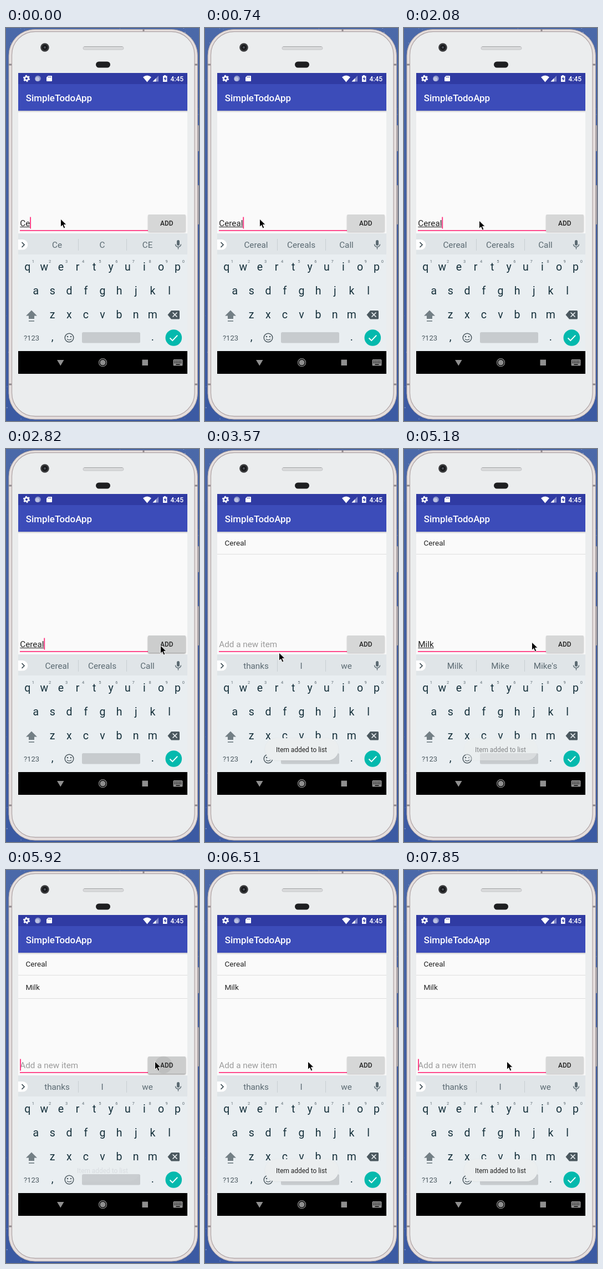
These frames come from a looping animation (348 px wide and 708 px high, 8000 ms). An HTML page:

```html
<!DOCTYPE html>
<html lang="en">
<head>
<meta charset="utf-8">
<title>Todo app</title>
<style>
html, body { margin: 0; width: 100%; height: 100%; overflow: hidden; background: #4362a4; }
svg { display: block; width: 348px; height: 708px; font-family: Roboto, sans-serif; }
.mid { text-anchor: middle; }
.med { font-weight: 500; }
.key { font-size: 19.5px; fill: #15303b; text-anchor: middle; }
.num { font-size: 7.5px; fill: #5f6c73; text-anchor: middle; }
.tip { font-size: 15.25px; fill: #5b6a72; text-anchor: middle; }
.row { font-size: 13.55px; fill: #212121; }
</style>
</head>
<body>
<svg viewBox="0 0 348 708">
  <defs>
    <linearGradient id="sky" x2="0" y2="1">
      <stop stop-color="#4b69a9"/><stop offset=".5" stop-color="#405da0"/><stop offset="1" stop-color="#3b5aa3"/>
    </linearGradient>
    <linearGradient id="shade" x2="0" y2="1">
      <stop stop-opacity=".2"/><stop offset="1" stop-opacity="0"/>
    </linearGradient>
    <filter id="soft" x="-20%" y="-40%" width="140%" height="180%"><feGaussianBlur stdDeviation="1.3"/></filter>
  </defs>
  <rect width="348" height="708" fill="url(#sky)"/>
  <g id="stars" fill="#b7c6e2"></g>

  <!-- phone -->
  <g fill="#a9a4a8">
    <rect x="343" y="175" width="5" height="47" rx="1.5"/>
    <rect x="343" y="283" width="5" height="71" rx="1.5"/>
  </g>
  <rect x="5" y="2.5" width="340.5" height="702.5" rx="47" fill="#e6dfde" stroke="#a79fa2"/>
  <path d="M5 66h5M340 66h5M5 642h5M340 642h5M248 2v4" stroke="#8f888c" stroke-width="3"/>
  <rect x="10.500" y="6.500" width="329.500" height="693" rx="42" fill="#ebedee" stroke="#b3a9aa" stroke-width="1.300"/>
  <circle cx="70" cy="35" r="7.8" fill="#3a3b3d"/>
  <circle cx="70" cy="35" r="5" fill="#18191b"/>
  <circle cx="70" cy="35" r="2" fill="#4b4e55"/>
  <rect x="139" y="33.5" width="73" height="5.500" rx="2.700" fill="#d9dadb" stroke="#c3c4c6"/>
  <path d="M141 33.500h69" stroke="#a2a3a5"/>
  <rect x="162" y="60.5" width="26" height="11" rx="5.5" fill="#1e1f21"/>

  <!-- app -->
  <rect x="22" y="81" width="305" height="542" fill="#fafafa"/>
  <g id="items"></g>
  <rect x="22" y="149" width="305" height="3.500" fill="url(#shade)"/>
  <rect x="22" y="101" width="305" height="48" fill="#3c4cb9"/>
  <rect x="22" y="81" width="305" height="20" fill="#303ba3"/>
  <text x="35.8" y="131.8" font-size="16.9" class="med" fill="#fff">SimpleTodoApp</text>
  <g fill="#fff">
    <circle cx="37" cy="91" r="3.4" fill="none" stroke="#fff" stroke-width="2.6"/>
    <circle cx="37" cy="91" r="5.3" fill="none" stroke="#fff" stroke-width="1.8" stroke-dasharray="2.8 2.75"/>
    <circle cx="57.5" cy="91" r="5.3" fill="#8f98cc"/>
    <circle cx="56.5" cy="92" r="3.8" fill="#bcc2e2"/>
    <path d="M76 86h6q1 0 1 1v8q0 1-1 1h-8q-1 0-1-1v-6z"/>
    <path d="M76.5 87.5v2M78.5 87.5v2M80.5 87.5v2" stroke="#303ba3" stroke-width=".9"/>
    <path d="M247 88.500Q254.500 82.500 262 88.500L254.500 97.500z"/>
    <path d="M275 86v10.500h-10.500z" opacity=".4"/>
    <path d="M270.500 90.500v6h-6z"/>
    <path d="M285 85h3v1.200h2.500v10.800h-7.500v-10.800h2z"/>
    <path d="M287.500 87.500l-3 4.500h2v3.500l3-4.700h-2z" fill="#303ba3"/>
    <text x="296.500" y="95.600" font-size="12" class="med">4:45</text>
  </g>

  <!-- entry line -->
  <text id="entry" x="25.300" y="357" font-size="15.25"></text>
  <rect id="under" x="25.300" y="358" height="1" fill="#212121"/>
  <rect x="25" y="364" width="231" height="1.700" fill="#ff2f7c"/>
  <rect id="caret" y="340.500" width="1.800" height="21" fill="#ff2f7c"/>
  <rect id="glow" x="256" y="337.500" width="68" height="31" rx="2" filter="url(#soft)"/>
  <rect id="button" x="256" y="336" width="68" height="31" rx="2"/>
  <circle id="ripple" cx="284" cy="351" r="15.500"/>
  <text x="289.700" y="355.900" font-size="11.860" class="mid med" fill="#212121">ADD</text>

  <!-- keyboard -->
  <rect x="22" y="370" width="305" height="213" fill="#e9eef1"/>
  <rect x="22" y="370" width="305" height="38" fill="#e0e5e8"/>
  <path d="M22 381h8a9.300 9.300 0 0 1 0 18.600h-8z" fill="#fff"/>
  <path d="M28.500 386l4.500 4.500-4.500 4.500" fill="none" stroke="#37474f" stroke-width="1.700"/>
  <path d="M130.500 380v21M217.500 380v21" stroke="#c8ced2"/>
  <g id="tips"></g>
  <rect x="308" y="382" width="5" height="10" rx="2.500" fill="#5b6a72"/>
  <path d="M305.500 389.500a5 5 0 0 0 10 0M310.500 394.500v4" fill="none" stroke="#5b6a72" stroke-width="1.400"/>
  <g id="keys"></g>
  <path d="M46 508.500l10 10h-5v5.500h-10v-5.500h-5z" fill="#737f85"/>
  <rect x="41" y="527" width="10" height="1.700" fill="#737f85"/>
  <path d="M298 509h13.500q1.500 0 1.500 1.500v12.500q0 1.500-1.500 1.500h-13.500l-6.500-7.800z" fill="#4b585f"/>
  <path d="M300.500 512.500l8 8m0-8l-8 8" stroke="#e9eef1" stroke-width="1.700"/>
  <text x="46" y="562.600" font-size="13" class="mid" fill="#4b585f">?123</text>
  <g fill="#4b585f">
    <circle cx="114" cy="558" r="7.800" fill="none" stroke="#4b585f" stroke-width="1.500"/>
    <circle cx="111" cy="556" r="1.300"/><circle cx="117" cy="556" r="1.300"/>
    <path d="M110 560a4.500 3.500 0 0 0 8 0" fill="none" stroke="#4b585f" stroke-width="1.300"/>
  </g>
  <rect x="137" y="548" width="105" height="19.500" rx="2.500" fill="#c7cbce"/>
  <circle cx="302.300" cy="558" r="14.800" fill="#04b9ad"/>
  <path d="M295.500 558.500l4.700 4.700 9-9.500" fill="none" stroke="#fff" stroke-width="1.900"/>

  <!-- navigation bar -->
  <rect x="22" y="582" width="305" height="41" fill="#000"/>
  <g fill="#8f8f8f">
    <path d="M92 598h12.500l-6.200 10.500z"/>
    <circle cx="174.500" cy="602.700" r="5"/>
    <circle cx="174.500" cy="602.700" r="7" fill="none" stroke="#8f8f8f" stroke-width="1.200"/>
    <rect x="245.500" y="597.500" width="10.500" height="10.500"/>
    <rect x="301.500" y="597" width="17" height="11.500" rx="1.500"/>
    <path d="M303.500 600h13M303.500 603h13" stroke="#000" stroke-width="1.600" stroke-dasharray="1.600 1.200"/>
    <path d="M306.500 606.300h7" stroke="#000" stroke-width="1.400"/>
  </g>

  <g id="toast">
    <rect x="108.500" y="522" width="132" height="39" rx="19.500" opacity=".1" filter="url(#soft)"/>
    <rect x="108" y="521" width="133" height="40" rx="20" fill="#ebeeef"/>
    <text x="174" y="546" font-size="11.900" class="mid" fill="#212121">Item added to list</text>
  </g>
  <path id="mouse" d="M.5 0v14.500l3.300-3.200 2.400 5.600 2.600-1.100-2.400-5.500h4.600z" stroke="#fff" stroke-width=".9"/>
</svg>
<script>
const $ = id => document.getElementById(id);
const text = (cls, x, y, s) => `<text class="${cls}" x="${x}" y="${y}">${s}</text>`;

let seed = 7;
const rnd = () => (seed = seed * 16807 % 2147483647) / 2147483647;
let dots = '';
for (let i = 0; i < 700; i++)
  dots += `<circle cx="${rnd() * 348}" cy="${rnd() * 708}" r="${.3 + rnd() * .8}" opacity="${.2 + rnd() * .6}"/>`;
$('stars').innerHTML = dots;

let keys = '';
[['qwertyuiop', 38.7, 437], ['asdfghjkl', 53.7, 480], ['zxcvbnm', 83.7, 523], [',', 83.7, 563], ['.', 264.3, 563]]
  .forEach(([row, x0, y], r) => [...row].forEach((c, i) => {
    const x = x0 + i * 30.1;
    keys += text('key', x, y, c);
    if (!r) keys += text('num', x + 10.2, 423, (i + 1) % 10);
  }));
$('keys').innerHTML = keys;
$('tips').innerHTML = [92, 173.5, 255].map(x => text('tip', x, 396, '')).join('');
$('items').innerHTML = ['Cereal', 'Milk'].map((s, i) =>
  `<g>${text('row', 35.5, 174.2 + i * 41.5, s)}<path d="M22 ${189.5 + i * 42}h305" stroke="#dedede"/></g>`).join('');

// Each track lists [start in ms, value...]
const typed = [[0, 'Ce'], [150, 'Cer'], [450, 'Cere'], [600, 'Cerea'], [740, 'Cereal'], [2970, ''],
  [3860, 'M'], [4300, 'Mi'], [4450, 'Mil'], [4740, 'Milk'], [5770, '']];
const tips = [[0, 'Ce C CE'], [150, 'Cer Cerro Certainly'], [450, 'Cere Cereal Ceremony'], [600, 'Cerea Cereal Cereals'],
  [740, 'Cereal Cereals Call'], [3120, 'thanks I we'], [4010, 'M My Me'], [4300, 'Mi Mid Miss'],
  [4450, 'Mil Milk Mill'], [4740, 'Milk Mike Mike\'s'], [5770, 'thanks I we']];
const blinks = [1340, 1780, 2230, 2820, 3570, 3860, 5180, 5620, 6360, 6800, 7400, 7850];
const mouse = [[0, 98, 344], [2080, 135, 347], [2230, 206, 355], [2370, 260, 358], [2520, 278, 354],
  [3270, 262, 358], [3420, 200, 364], [3570, 133, 367], [5040, 178, 357], [5180, 230, 348],
  [5330, 260, 345], [5480, 268, 345], [6210, 252, 345], [6360, 212, 345], [6510, 185, 345]];
const toast = [[0, 0], [3120, .08], [3270, .6], [3420, 1], [5040, .9], [5180, .5], [5330, 0],
  [5920, .08], [6070, .6], [6210, 1]];
const press = [[0, 0], [2820, 1], [2970, 2], [3120, 2], [3270, 0], [5620, 1], [5770, 2], [6070, 0]];

const at = (track, t) => track.findLast(e => e[0] <= t);
const set = (id, o) => { for (const k in o) $(id).setAttribute(k, o[k]); };

function draw(t) {
  const word = at(typed, t)[1], entry = $('entry');
  entry.textContent = word || 'Add a new item';
  entry.setAttribute('fill', word ? '#212121' : '#9b9b9b');
  const w = word ? entry.getComputedTextLength() : 0;
  set('under', { width: w });
  set('caret', { x: 25.2 + w, opacity: blinks.filter(b => b <= t).length % 2 ? 0 : 1 });

  const words = at(tips, t)[1].split(' ');
  [...$('tips').children].forEach((e, i) => e.textContent = words[i]);
  [2970, 5770].forEach((start, i) => $('items').children[i].setAttribute('opacity', t >= start ? 1 : 0));

  const p = at(press, t)[1];
  set('button', { fill: p ? '#cccdcd' : '#d6d7d7' });
  set('glow', { opacity: p ? .4 : .2 });
  set('ripple', { opacity: p > 1 ? .07 : 0 });
  set('toast', { opacity: at(toast, t)[1] });
  const [, x, y] = at(mouse, t);
  set('mouse', { transform: `translate(${x} ${y})` });
}

function tick() {
  draw(performance.now() % 8000);
  requestAnimationFrame(tick);
}
tick();
</script>
</body>
</html>
```
